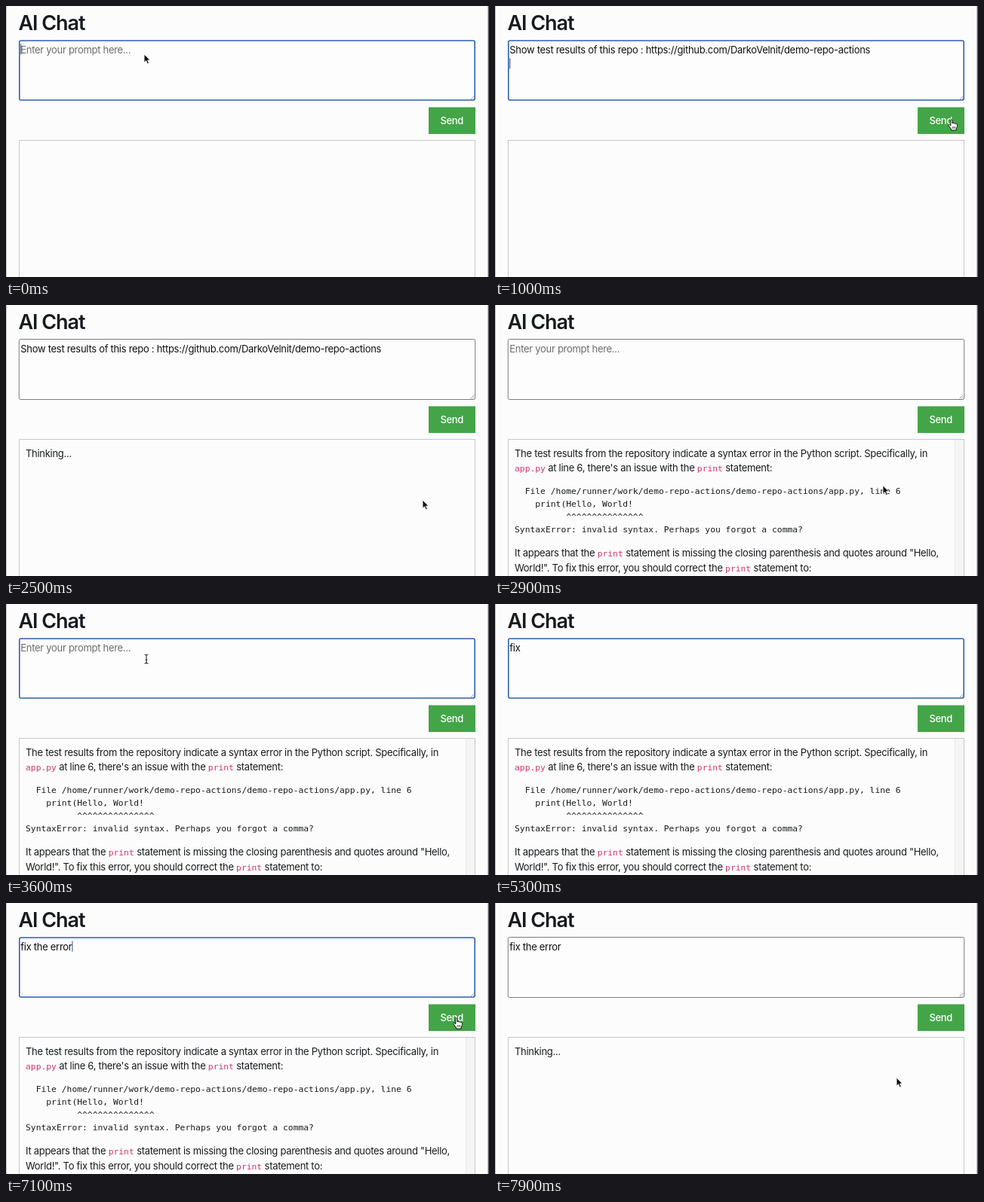
Write an HTML page that moves like this. It is 640 by 360 pixels and loops after 8 s.

```html
<!DOCTYPE html>
<html lang="en">
<head>
<meta charset="utf-8">
<title>AI Chat</title>
<style>
  html, body { margin: 0; width: 100%; height: 100%; overflow: hidden; background: #fcfcfc; }
  svg { display: block; width: 640px; height: 360px; }
  text { font: 13px Inter, "Open Sans", sans-serif; letter-spacing: -.295px; fill: #181b1e; white-space: pre; }
  .title { font-size: 27px; font-weight: 600; letter-spacing: -1.05px; }
  .mono { font: 11.33px "DejaVu Sans Mono", monospace; letter-spacing: 0; }
  .code { fill: #d0326f; }
  .input { fill: #111; }
  .hint { fill: #6c6c6c; }
  .label { fill: #fff; font-weight: 500; letter-spacing: -.4px; }
</style>
</head>
<body>
<svg viewBox="0 0 640 360">
  <rect width="640" height="360" fill="#fcfcfc"/>
  <rect width="1" height="360" fill="#b9bcc4"/>
  <rect x="638.6" width="1.4" height="360" fill="#55585d"/>
  <text class="title" x="16.5" y="32.2">AI Chat</text>

  <rect id="box" fill="#fdfdfd"/>
  <path d="M615.5 124.5l5-5M618.5 124.5l2-2" stroke="#888" stroke-width=".8"/>
  <text id="field" x="19.3" y="62.7"></text>
  <rect id="caret" width="1" height="14" fill="#3d4a6b"/>

  <rect x="560" y="134.5" width="62" height="35.5" fill="#43a548"/>
  <text class="label" x="575.5" y="157.2">Send</text>

  <rect x="17.5" y="178.5" width="604" height="200" fill="#fcfcfc" stroke="#c8c8c8"/>
  <text id="wait" x="26" y="201.7">Thinking...</text>
  <g id="reply">
    <rect x="609.5" y="179" width="11.5" height="181" fill="#f5f5f5"/>
    <path d="M609.5 179v181" stroke="#e8e8e8"/>
  </g>

  <g id="arrow"><path d="M0 0v11.2l2.6-2.4 1.8 4.2 2-.9-1.8-4 3.4-.2z" fill="#111" stroke="#fff" stroke-width=".9"/></g>
  <g id="beam"><path d="M-2.5-6q2 0 2.5 1.2q.5-1.2 2.5-1.2M0-5v10M-2.5 6q2 0 2.5-1.2q.5 1.2 2.5 1.2M-1.3 1.2h2.6" fill="none" stroke="#222" stroke-width="1.1"/></g>
  <g id="hand"><path d="M-1.2.9C-1.2-.5 1-.5 1 .9V5C1.4 4 3 4.1 3.2 5.2 3.8 4.4 5.2 4.7 5.4 5.8 6.2 5.2 7.6 5.7 7.5 7 7.5 9.5 7 10.5 6.2 12V14H-.6V12.3C-2 10.8-3 9-4.2 7.4-4.6 6.3-3.2 5.7-2.2 6.8L-1.2 8Z" fill="#fff" stroke="#111" stroke-width="1"/>
    <path d="M1.3 9v3M3 9v3M4.7 9v3" stroke="#222" stroke-width=".7"/></g>
</svg>
<script>
const $ = id => document.getElementById(id);
const LOOP = 8000, STEP = 100;
const REPO = "Show test results of this repo : https://github.com/DarkoVelnit/demo-repo-actions";

// Backticks mark inline code; a leading "|" marks a preformatted line.
const LINES = [
  [201.7, "The test results from the repository indicate a syntax error in the Python script. Specifically, in"],
  [221.3, "`app.py` at line 6, there's an issue with the `print` statement:"],
  [251, "|  File /home/runner/work/demo-repo-actions/demo-repo-actions/app.py, line 6"],
  [268, "|    print(Hello, World!"],
  [285, "|" + " ".repeat(10) + "^".repeat(15)],
  [302, "|SyntaxError: invalid syntax. Perhaps you forgot a comma?"],
  [334.2, "It appears that the `print` statement is missing the closing parenthesis and quotes around \"Hello,"],
  [354, "World!\". To fix this error, you should correct the `print` statement to:"]
];

function svg(tag, parent, attrs, text) {
  const el = document.createElementNS("http://www.w3.org/2000/svg", tag);
  for (const k in attrs) el.setAttribute(k, attrs[k]);
  if (text) el.textContent = text;
  return parent.appendChild(el);
}

for (const [y, line] of LINES) {
  if (line[0] === "|") {
    svg("text", $("reply"), { x: 26, y, class: "mono" }, line.slice(1));
    continue;
  }
  const row = svg("text", $("reply"), { x: 26, y });
  line.split("`").forEach((part, i) => {
    if (part) svg("tspan", row, i % 2 ? { class: "mono code" } : {}, part);
  });
}

// Each table lists [start time, value]; the value holds until the next row.
const FIELD = [[0, ""], [300, REPO + "\n"], [2800, ""], [4300, "f"], [4400, "fi"], [4500, "fix"],
  [5800, "fix t"], [5900, "fix the"], [6000, "fix the er"], [6100, "fix the error"]];
const FOCUS = [[0, true], [1100, false], [3300, true], [7300, false]];
const CARET = [[0, true], [3600, false], [3800, true], [4100, false], [4300, true], [4800, false],
  [5000, true], [5300, false], [5500, true], [6400, false], [6600, true], [6900, false], [7100, true]];
const PANEL = [[0, ""], [1200, "wait"], [2800, "reply"], [7400, "wait"]];
const SHOWN = [[0, true], [4300, false], [6500, true]];

// Pointer path: [time, x, y]
const PATH = [[0, 183, 64], [400, 186, 70], [900, 605, 151], [1900, 605, 151], [2300, 552, 259],
  [2800, 552, 259], [3300, 186, 73], [6500, 186, 73], [7000, 597, 153], [7400, 597, 153], [7900, 532, 232], [8000, 532, 232]];

const at = (table, t) => table.filter(row => row[0] <= t).pop()[1];

function pointer(t) {
  const i = PATH.findIndex(p => p[0] > t);
  const [t0, x0, y0] = PATH[i - 1], [t1, x1, y1] = PATH[i];
  const u = (t - t0) / (t1 - t0), k = u * u * (3 - 2 * u);
  return [x0 + (x1 - x0) * k, y0 + (y1 - y0) * k];
}

const show = (id, on) => { $(id).style.display = on ? "" : "none"; };

function drawField(t) {
  const value = at(FIELD, t), focus = at(FOCUS, t), field = $("field"), inset = focus ? 1 : .5;
  const box = { x: 17 + inset - .2, y: 45 + inset, width: 605.4 - 2 * inset, height: 81 - 2 * inset, rx: 2,
    stroke: focus ? "#325fb2" : "#7c7c7c", "stroke-width": focus ? 1.6 : 1 };
  for (const k in box) $("box").setAttribute(k, box[k]);

  field.textContent = value.trim() || "Enter your prompt here...";
  field.setAttribute("class", value ? "input" : "hint");
  const newline = value.endsWith("\n");
  const end = value && !newline ? field.getComputedTextLength() : 0;
  $("caret").setAttribute("x", 19.3 + end);
  $("caret").setAttribute("y", newline ? 69.5 : 50.5);
  show("caret", focus && at(CARET, t));
}

function drawPointer(t) {
  const [x, y] = pointer(t);
  const inside = (l, top, r, b) => x > l && x < r && y > top && y < b;
  const kind = inside(560, 134, 622, 170) ? "hand" : t >= 100 && inside(17, 45, 622, 126) ? "beam" : "arrow";
  for (const id of ["arrow", "beam", "hand"]) show(id, id === kind && at(SHOWN, t));
  $(kind).setAttribute("transform", `translate(${x} ${y})`);
}

function draw(t) {
  const panel = at(PANEL, t);
  show("wait", panel === "wait");
  show("reply", panel === "reply");
  drawField(t);
  drawPointer(t);
}

const start = performance.now();
function tick() {
  const t = (performance.now() - start) % LOOP;
  draw(Math.floor(t / STEP) * STEP);
  requestAnimationFrame(tick);
}
tick();
</script>
</body>
</html>
```
